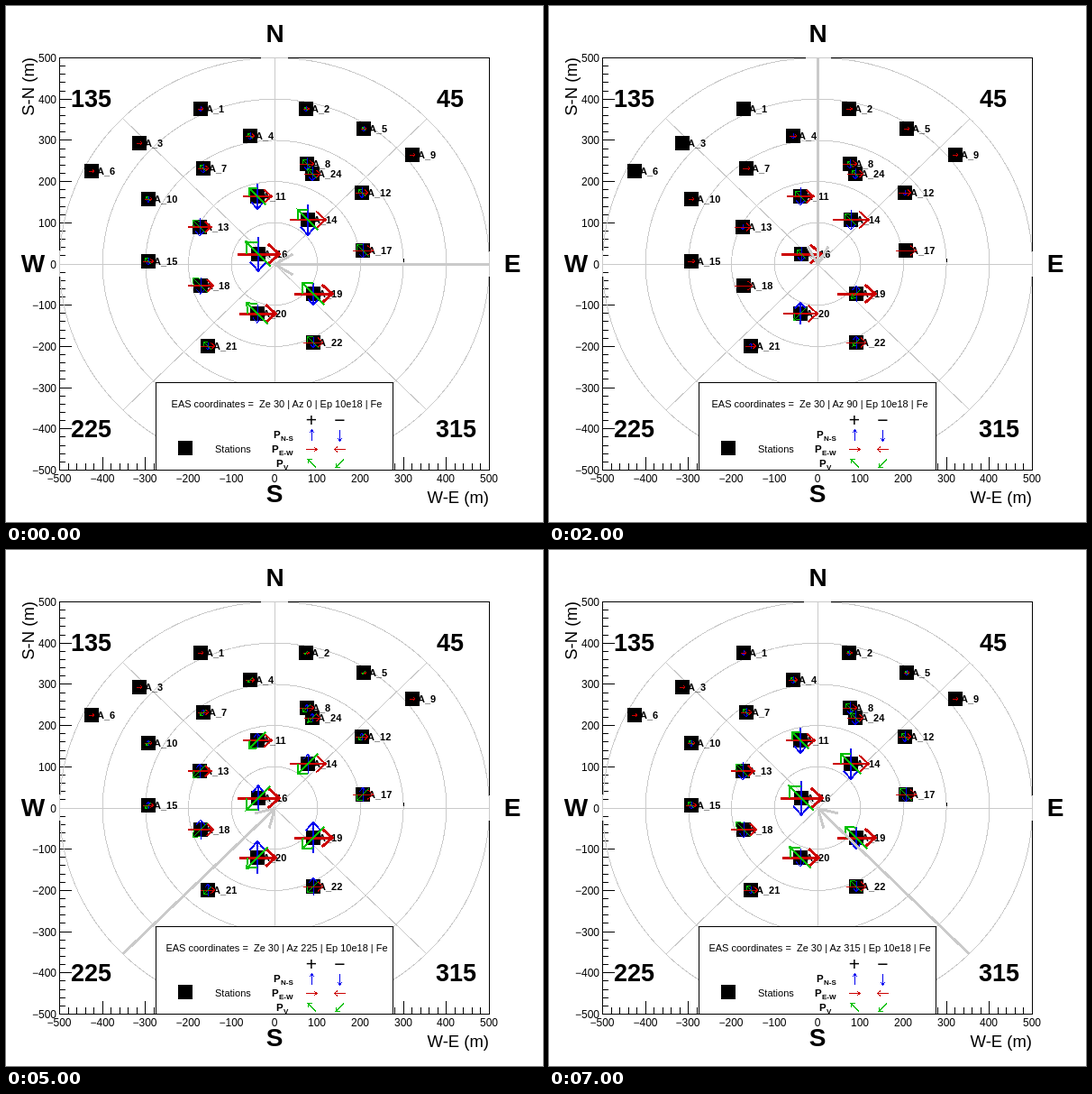
An HTML page that plays this animation: 596 by 572 pixels, repeating every 8 s.

```html
<!DOCTYPE html>
<html lang="en">
<head>
<meta charset="utf-8">
<title>Station signals by shower azimuth</title>
<style>
html, body { margin: 0; width: 100%; height: 100%; overflow: hidden; background: #fff; }
svg { display: block; shape-rendering: crispEdges; font-family: "Liberation Sans", Arial, sans-serif; }
.b { font-weight: bold; }
</style>
</head>
<body>
<svg id="stage" width="596" height="572" viewBox="0 0 596 572">
  <g id="grid"></g>
  <g id="stations"></g>
  <g id="signals"></g>
  <g id="legend"></g>
  <text id="title" x="300.5" y="445" font-size="11" text-anchor="middle" xml:space="preserve"></text>
  <g id="shower"></g>
</svg>
<script>
const $ = id => document.getElementById(id);
const CX = 298, CY = 286, SX = 0.477, SY = 0.457; // centre and pixels per metre
const BLUE = '#0000f0', RED = '#cc0000', GREEN = '#00c000', GRAY = '#cacaca';

// station sites in order of their numbers; 23 does not exist
const stations = [
  [216, 114], [333, 114], [148, 152], [271, 144], [397, 136], [95, 183],
  [219, 180], [334, 175], [451, 165], [158, 214], [279, 211], [395, 207],
  [215, 245], [335, 237], [158, 283], [280, 275], [396, 271], [216, 310],
  [341, 319], [279, 341], [224, 377], [341, 373], [340, 186]
];

const line = (x1, y1, x2, y2, color = '#000') =>
  `<line x1="${x1}" y1="${y1}" x2="${x2}" y2="${y2}" stroke="${color}"/>`;
const rect = (x, y, w, h, fill, extra = '') =>
  `<rect x="${x}" y="${y}" width="${w}" height="${h}" fill="${fill}" ${extra}/>`;
const text = (s, x, y, size, anchor = 'start', extra = '') =>
  `<text x="${x}" y="${y}" font-size="${size}" text-anchor="${anchor}" ${extra}>${s}</text>`;
const bold = (s, x, y, size, anchor) => text(s, x, y, size, anchor, 'class="b"');
const square = (x, y) => rect(x - 8, y - 8, 16, 16, '#000');

function arrow(x1, y1, x2, y2, color, w, barb, spread = 0.72) {
  const back = Math.atan2(y1 - y2, x1 - x2);
  const end = a => `${(x2 + barb * Math.cos(a)).toFixed(2)} ${(y2 + barb * Math.sin(a)).toFixed(2)}`;
  return `<path d="M${x1} ${y1}L${x2} ${y2}M${end(back - spread)}L${x2} ${y2}L${end(back + spread)}"` +
    ` fill="none" stroke="${color}" stroke-width="${w}"/>`;
}

// arrow centred on a point
function signal(x, y, dx, dy, color) {
  const len = Math.hypot(dx, dy);
  if (len < 5) return '';
  const w = Math.min(3, Math.max(1, Math.round(len / 16)));
  return arrow(x - dx / 2, y - dy / 2, x + dx / 2, y + dy / 2, color, w, len * 0.36);
}

function drawGrid() {
  let s = rect(59.5, 57.5, 477, 457, 'none', 'stroke="#000"');
  for (let m = -500; m <= 500; m += 20) {
    const major = m % 100 === 0, len = major ? 14 : 7;
    const x = Math.floor(CX + m * SX) + 0.5, y = Math.floor(CY - m * SY) + 0.5;
    s += line(59, y, 59 + len, y) + line(x, 514, x, 514 - len);
    if (major) {
      const label = m < 0 ? '\u2212' + -m : m;
      s += text(label, 56, y + 4.5, 12, 'end') + text(label, x - 0.5, 528, 12, 'middle');
    }
  }
  // the outer ring covers the frame where they touch
  for (let r = 100; r <= 500; r += 100)
    s += `<ellipse cx="${CX}" cy="${CY}" rx="${r * SX}" ry="${r * SY}" fill="none" stroke="${GRAY}"/>`;
  for (let i = 0; i < 4; i++) {
    const a = i * Math.PI / 4, x = CX + 0.5, y = CY + 0.5;
    const dx = 500 * SX * Math.cos(a), dy = 500 * SY * Math.sin(a);
    s += line(x - dx, y - dy, x + dx, y + dy, GRAY);
  }
  s += line(441.5, 280, 441.5, 284);
  s += text('W-E (m)', 536, 551, 18.5, 'end');
  s += text('S-N (m)', 0, 0, 18.5, 'end', 'transform="translate(31 57) rotate(-90)"');
  s += bold('N', 298.5, 40, 28, 'middle') + bold('S', 298, 550, 28, 'middle');
  s += bold('W', 30, 295, 28, 'middle') + bold('E', 562, 295, 28, 'middle');
  s += bold('135', 72, 112, 27) + bold('45', 478, 112, 27);
  s += bold('225', 72, 478, 27) + bold('315', 477, 478, 27);
  $('grid').innerHTML = s;
}

function drawStations() {
  $('stations').innerHTML = stations.map(([x, y], i) =>
    bold('A_' + (i < 22 ? i + 1 : i + 2), x + 6, y + 4, 11) + square(x, y)).join('');
}

function drawLegend() {
  const name = (sub, x, y) => bold('P', x, y, 11.5) + bold(sub, x + 8, y + 3, 8);
  $('legend').innerHTML =
    rect(166.5, 417.5, 263, 97, '#fff', 'stroke="#000"') +
    text('+', 339, 466, 21, 'middle') + text('\u2212', 370.5, 466, 21, 'middle') +
    name('N-S', 297, 479) + name('E-W', 295, 495) + name('V', 300, 511) +
    square(199, 490) + text('Stations', 232, 495, 11) +
    signal(339.5, 476, 0, -12, BLUE) + signal(370.5, 476, 0, 12, BLUE) +
    signal(339, 491.5, 12, 0, RED) + signal(370.5, 491.5, -12, 0, RED) +
    signal(339.5, 507, -9, -9, GREEN) + signal(370.5, 507, -9, 9, GREEN);
}

// East-west strength fades with distance from the core. The other two follow
// the shower's east-west side and, for showers along N-S, the station's side.
function stationSignals(x, y, az) {
  const dist = Math.hypot((x - CX) / SX, (y - CY) / SY);
  const up = (CY - y) / Math.hypot(x - CX, y - CY);
  const west = Math.min(1, Math.max(0, (CX - x) / 85));
  const turn = Math.tanh(4 * Math.cos(az)), side = 1 - Math.abs(turn);
  const fade = 1 - 0.3 * west * Math.max(0, Math.sin(az));
  const ew = fade * (4 + 43 / (1 + (dist / 195) ** 4));
  const ns = -ew * (0.7 * turn + (0.2 + 0.5 * side) * up);
  const v = ew * (0.58 * turn + 0.4 * side * up);
  return signal(x, y, 0, -ns, BLUE) + signal(x, y, ew, 0, RED) +
    signal(x, y, -Math.abs(v), -v, GREEN);
}

function drawStep(step) {
  const deg = step * 45, az = deg * Math.PI / 180;
  $('title').textContent = `EAS coordinates =  Ze 30 | Az ${deg} | Ep 10e18 | Fe`;
  $('signals').innerHTML = stations.map(([x, y]) => stationSignals(x, y, az)).join('');
  $('shower').innerHTML = arrow(CX + 500 * SX * Math.cos(az), CY + 0.5 - 500 * SY * Math.sin(az),
    CX + 0.5, CY + 0.5, GRAY, 3, 23, Math.PI / 6);
}

drawGrid();
drawStations();
drawLegend();
drawStep(0);

const start = performance.now();
let shown = 0;
function tick() {
  const step = Math.floor((performance.now() - start) / 1000) % 8;
  if (step !== shown) drawStep(shown = step);
  requestAnimationFrame(tick);
}
requestAnimationFrame(tick);
</script>
</body>
</html>
```
